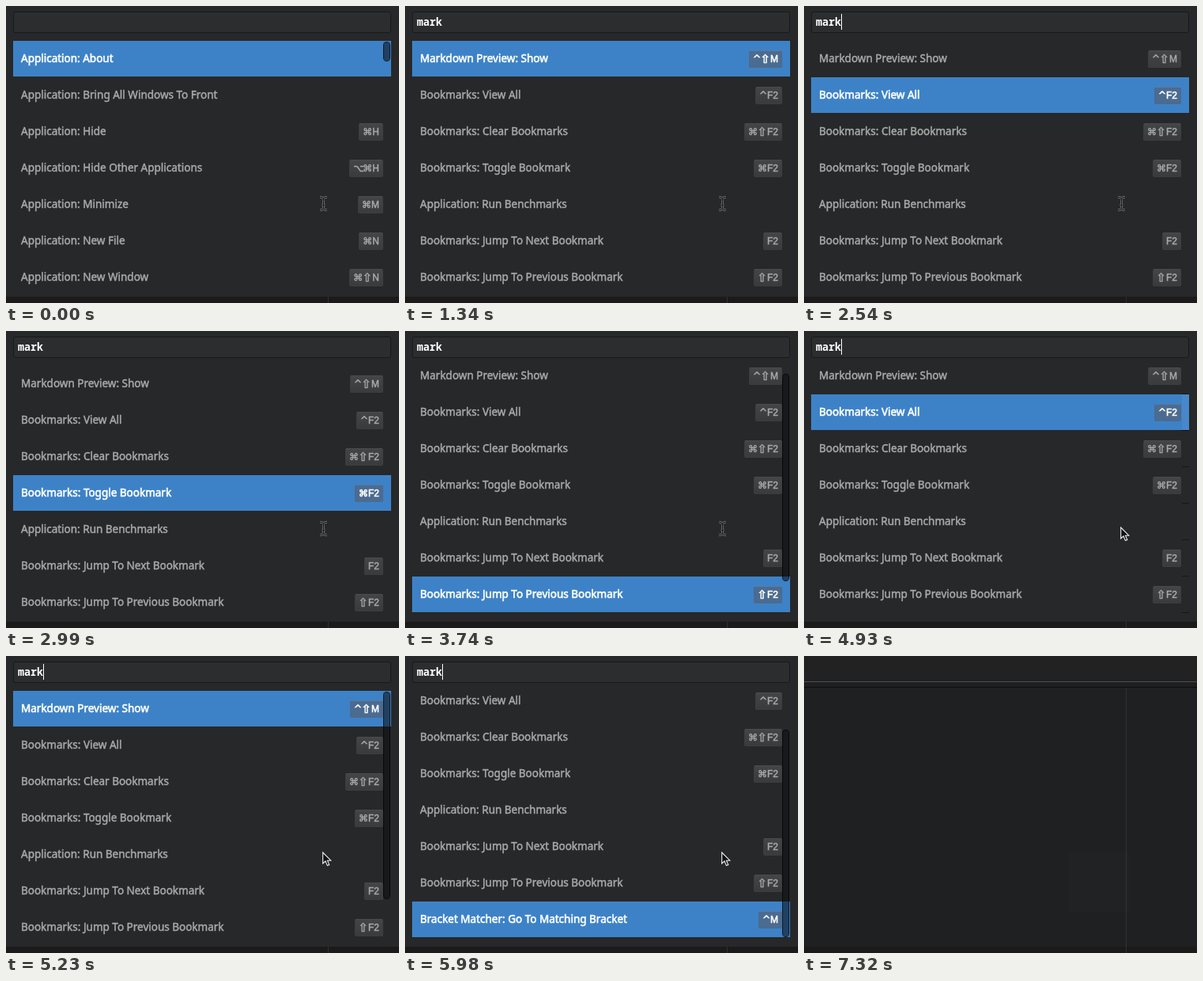
Write an HTML page that moves like this. It is 497 by 375 pixels and loops after 8220 ms.

```html
<!DOCTYPE html>
<html lang="en">
<head>
<meta charset="utf-8">
<title>Command palette</title>
<style>
html, body { margin: 0; width: 100%; height: 100%; overflow: hidden; background: #1f2021; }
#stage { position: relative; width: 497px; height: 375px; overflow: hidden; background: #1f2021; }
#stage div, #stage svg { position: absolute; }
#editor { inset: 0; }
#top { left: 0; top: 0; width: 497px; height: 32px; background: #222; border-bottom: 1px solid #4e4e4e; }
#tabs { left: 0; top: 33px; width: 497px; height: 6px; background: #1e1f20; border-bottom: 1px solid #0d0d0d; }
#foot { left: 0; top: 367px; width: 497px; height: 8px; background: #1c1a1b; }
#wrap { left: 407px; top: 40px; width: 1px; height: 335px; background: #303132; }
#panel { left: 0; top: 0; width: 497px; height: 367px; background: #272829; }
#field { left: 9px; top: 7px; width: 476px; height: 25px; border: 1px solid #18191a; border-radius: 3px; background: #2c2d2f; }
#query { left: 15px; top: 10px; font: 600 13.33px/20px "Noto Sans Mono", monospace; color: #fff; white-space: pre; }
#caret { top: 10px; width: 1px; height: 20px; background: #fff; }
#view { left: 9px; top: 44px; width: 478px; height: 312px; overflow: hidden; }
#rows { left: 0; top: 0; width: 478px; }
#rows .row { left: 0; width: 478px; height: 45px; color: #aaa; font: 13.5px/44px "Noto Sans", sans-serif; -webkit-text-stroke: .45px; }
.row .name { left: 10px; white-space: pre; }
#rows .keys { right: 10px; top: 12px; height: 20px; padding: 0 4px; border: 1px solid #3d3e40; border-top-color: #4a4b4d; border-radius: 2px;
  background: linear-gradient(#444547, #3a3b3d); font: 12px/20px "Liberation Sans", Arial, sans-serif; white-space: nowrap; }
.keys i { display: inline-block; width: 12px; text-align: center; font: 12px/20px "DejaVu Sans", sans-serif; vertical-align: top; }
.keys i.ctl { width: 10px; }
.keys i.shift { font-size: 15px; text-indent: -.5px; }
#rows .sel { background: #3d82c7; color: #fff; -webkit-text-stroke: .6px; }
#rows .sel .keys { background: #4b6b90; border-color: #4b6b90; border-top-color: #587ba4; }
#rows.ruled .row::after { content: ""; position: absolute; right: 0; top: 45px; width: 9px; height: 1px; background: #151617; }
#rows.ruled .sel::before { content: ""; position: absolute; right: 0; top: 0; width: 9px; height: 45px; background: #4787ca; }
#bar { left: 477px; width: 7px; border: 1px solid rgba(0, 0, 0, .8); border-radius: 5px; background: rgba(12, 14, 18, .55); background-clip: padding-box; }
#mark { left: 335px; top: 247px; width: 76px; height: 76px; background: rgba(255, 255, 255, .008); }
</style>
</head>
<body>
<div id="stage">
  <div id="editor">
    <div id="top"></div><div id="tabs"></div><div id="foot"></div><div id="wrap"></div><div id="mark"></div>
  </div>
  <div id="palette">
    <div id="panel"></div>
    <div id="field"></div>
    <div id="query"></div>
    <div id="caret"></div>
    <div id="view"><div id="rows"></div></div>
    <div id="bar"></div>
  </div>
  <svg id="beam" width="13" height="21" style="left:395px;top:239px" fill="none">
    <defs><path id="beamPath" d="M2 2.5H4.5L6.5 4.5L8.5 2.5H11M6.5 4.5V16.5M2 18.5H4.5L6.5 16.5L8.5 18.5H11M4.5 12.5H8.5"/></defs>
    <use href="#beamPath" stroke="#7b8086" stroke-width="2.6"/>
    <use href="#beamPath" stroke="#1a1b1c" stroke-width="1.2"/>
  </svg>
  <svg id="arrow" width="13" height="19">
    <path d="M.7 1V15L4 12L6.4 17.6L8.8 16.6L6.5 11.2H10.8Z" fill="#111" stroke="#f2f2f2" stroke-width="1.1"/>
  </svg>
</div>
<script>
const LOOP = 8220, CLOSE = 6570, ROW = 46;
const $ = id => document.getElementById(id);

const lists = [
  [
    ["Application: About"],
    ["Application: Bring All Windows To Front"],
    ["Application: Hide", "⌘H"],
    ["Application: Hide Other Applications", "⌥⌘H"],
    ["Application: Minimize", "⌘M"],
    ["Application: New File", "⌘N"],
    ["Application: New Window", "⌘⇧N"]
  ],
  [
    ["Markdown Preview: Show", "^⇧M"],
    ["Bookmarks: View All", "^F2"],
    ["Bookmarks: Clear Bookmarks", "⌘⇧F2"],
    ["Bookmarks: Toggle Bookmark", "⌘F2"],
    ["Application: Run Benchmarks"],
    ["Bookmarks: Jump To Next Bookmark", "F2"],
    ["Bookmarks: Jump To Previous Bookmark", "⇧F2"],
    ["Bracket Matcher: Go To Matching Bracket", "^M"]
  ]
];

// start time, value
const typed = [[0, ""], [590, "m"], [890, "ma"], [1040, "mar"], [1190, "mark"]];
const listAt = [[0, 0], [740, 1]];
const selected = [[0, 0], [2540, 1], [2690, 2], [2990, 3], [3140, 4], [3440, 5], [3740, 6], [4190, 5],
  [4480, 4], [4630, 3], [4780, 2], [4930, 1], [5080, 0], [5530, 7], [5830, 0], [5980, 7]];
const scrolled = [[0, 0], [3740, 10], [5080, 0], [5530, 56], [5830, 0], [5980, 56]];
const barShown = [[0, 1], [590, 0], [3740, 1], [4330, 0], [5080, 1]];
const ruled = [[0, 0], [4330, 1], [5080, 0]];
const blinks = [150, 590, 890, 1340, 1790, 2090, 2540, 2990, 3440, 3740, 4190, 4630, 4930, 5380, 5830, 6120];
const pointer = [[0, null], [3890, [400, 247]], [7170, [335, 306]], [7320, null]];

const at = (steps, t) => steps.filter(s => s[0] <= t).pop()[1];
const show = (id, on) => { $(id).style.display = on ? "" : "none"; };

function keyCap(keys) {
  const glyphs = keys.replace(/[⌘⌥]/g, "<i>$&</i>")
    .replace("⇧", '<i class="shift">⇧</i>')
    .replace("^", '<i class="ctl">^</i>');
  return `<div class="keys">${glyphs}</div>`;
}

let shownList = -1;
function fill(n) {
  if (n === shownList) return;
  shownList = n;
  $("rows").innerHTML = lists[n].map(([name, keys], i) =>
    `<div class="row" style="top:${i * ROW}px"><div class="name">${name}</div>${keys ? keyCap(keys) : ""}</div>`).join("");
}

function draw(t) {
  const open = t < CLOSE;
  show("palette", open);
  show("mark", t >= 7170);

  const arrow = at(pointer, t);
  show("beam", t < 3890);
  show("arrow", arrow);
  if (arrow) {
    $("arrow").style.left = arrow[0] + "px";
    $("arrow").style.top = arrow[1] + "px";
  }
  if (!open) return;

  const text = at(typed, t), list = at(listAt, t), sel = at(selected, t), scroll = at(scrolled, t);
  $("query").textContent = text;
  $("caret").style.left = 15 + text.length * 8 + "px";
  show("caret", blinks.filter(b => b <= t).length % 2);

  fill(list);
  const rows = $("rows");
  rows.style.top = -scroll + "px";
  rows.className = at(ruled, t) ? "ruled" : "";
  [...rows.children].forEach((row, i) => row.classList.toggle("sel", i === sel));

  const bar = $("bar").style;
  show("bar", at(barShown, t));
  bar.top = 45 + Math.round(scroll * .85) + "px";
  bar.height = (list ? 260 : 23) + "px";
}

const start = performance.now();
function tick() {
  draw((performance.now() - start) % LOOP);
  requestAnimationFrame(tick);
}
tick();
</script>
</body>
</html>
```
